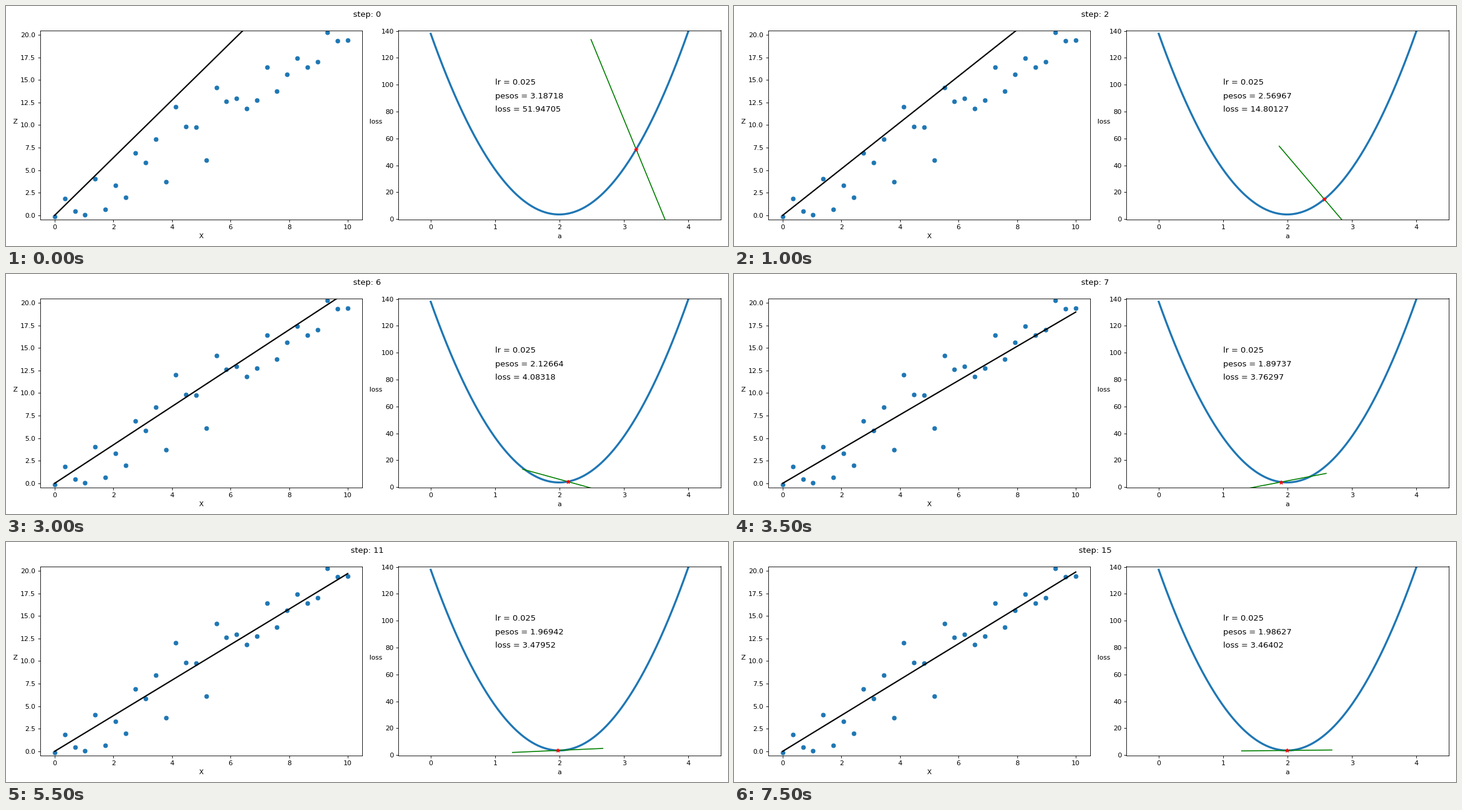
A matplotlib script that plays this animation: 1200 by 400 pixels, repeating every 8000 ms.

```python
import numpy as np
import matplotlib.pyplot as plt
from matplotlib.animation import FuncAnimation

WIDTH, HEIGHT, DPI = 1200, 400, 80
STEPS, INTERVAL = 16, 500

# Least-squares fit of z = a * x by gradient descent
X = np.linspace(0, 10, 30)
Z = np.array([
    -0.18, 1.88, 0.42, 0.02, 4.01, 0.62, 3.34, 1.95, 6.93, 5.87,
    8.46, 3.68, 12.05, 9.86, 9.79, 6.07, 14.18, 12.65, 12.98, 11.79,
    12.78, 16.44, 13.72, 15.58, 17.44, 16.44, 17.04, 20.30, 19.36, 19.43,
])
RATE = 0.025
CURVATURE = np.mean(X ** 2)
BEST, MIN_LOSS = 1.991411, 3.463123
START_ERROR = 1.1957696
DECAY = 1 - 2 * RATE * CURVATURE
REACH = 0.7


def loss(a):
    return MIN_LOSS + CURVATURE * (a - BEST) ** 2


def add_axes(left, xlabel, ylabel, xlim, ylim, xticks, yticks):
    bottom, width, height = 43.7, 535.65, 315.8
    ax = fig.add_axes([left / WIDTH, bottom / HEIGHT,
                       width / WIDTH, height / HEIGHT])
    ax.set(xlim=xlim, ylim=ylim, xticks=xticks, yticks=yticks)
    ax.set_xlabel(xlabel)
    ax.set_ylabel(ylabel, rotation=0, labelpad=7.5)
    return ax


fig = plt.figure(figsize=(WIDTH / DPI, HEIGHT / DPI), dpi=DPI)
title = fig.suptitle("", fontsize=12)

fit_ax = add_axes(56.65, "X", "Z", (-0.5, 10.5), (-0.5, 20.5),
                  np.arange(0, 11, 2), np.arange(0, 20.1, 2.5))
fit_ax.scatter(X, Z)
fit_line, = fit_ax.plot([], [], color="black", lw=2)

loss_ax = add_axes(652.35, "a", "loss", (-0.5, 4.5), (-0.5, 140.5),
                   np.arange(5), np.arange(0, 141, 20))
grid = np.linspace(0, 4.1, 200)
loss_ax.plot(grid, loss(grid), lw=3)
tangent, = loss_ax.plot([], [], color="green", lw=1.5)
star, = loss_ax.plot([], [], "r*")

loss_ax.text(1, 100, f"lr = {RATE}", fontsize=12)
weight_text = loss_ax.text(1, 90, "", fontsize=12)
loss_text = loss_ax.text(1, 80, "", fontsize=12)


def update(step):
    error = START_ERROR * DECAY ** step
    a = BEST + error
    value = loss(a)
    # The drawn slope is the gradient that led to this step
    slope = 2 * CURVATURE * error / DECAY

    title.set_text(f"step: {step}")
    fit_line.set_data([0, 10], [0, 10 * a])
    tangent.set_data([a - REACH, a + REACH],
                     [value - slope * REACH, value + slope * REACH])
    star.set_data([a], [value])
    weight_text.set_text(f"pesos = {a:.5f}")
    loss_text.set_text(f"loss = {value:.5f}")
    return title, fit_line, tangent, star, weight_text, loss_text


anim = FuncAnimation(fig, update, frames=STEPS, interval=INTERVAL,
                     repeat=True, repeat_delay=0)
plt.show()
```
